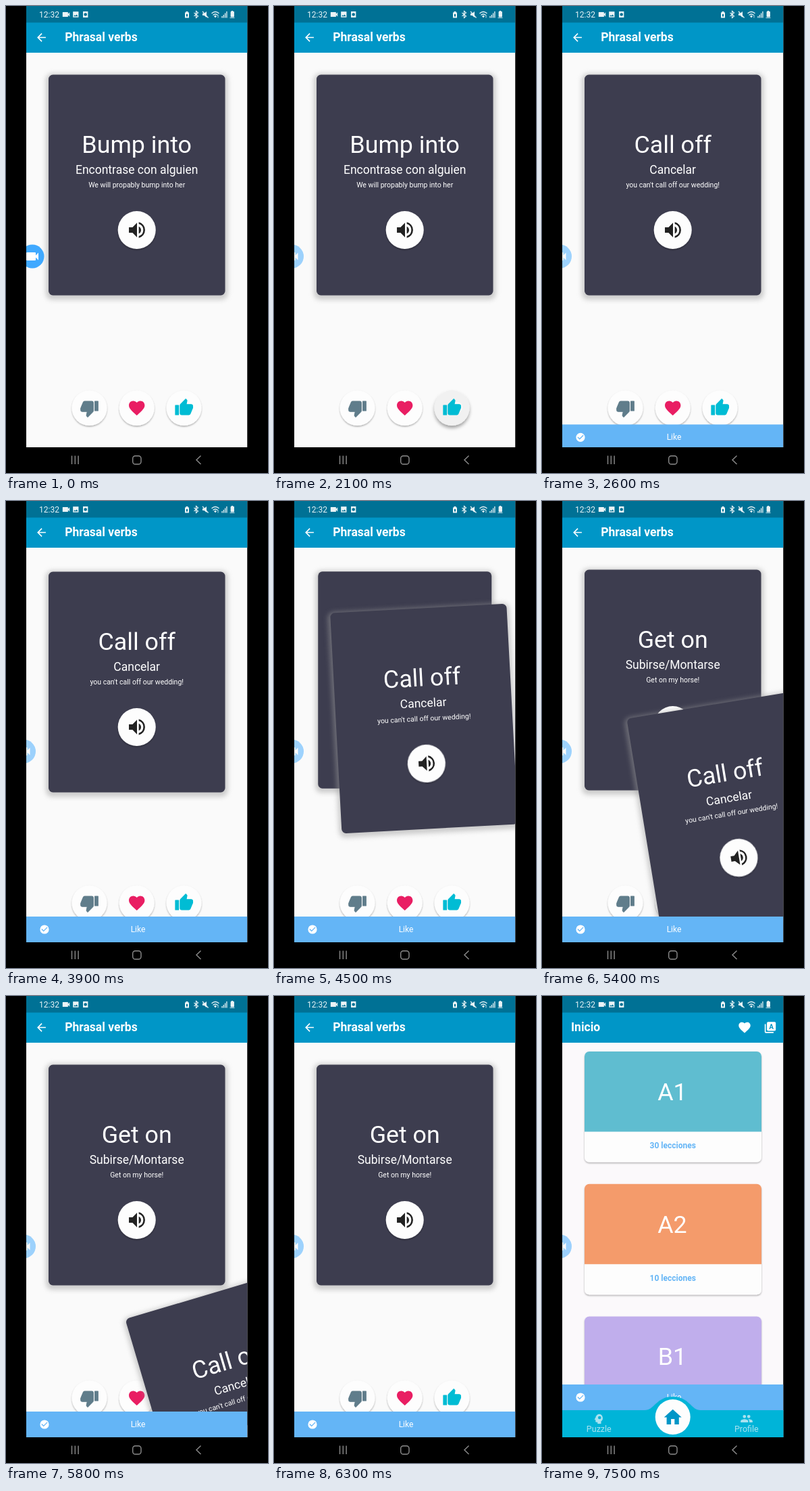
Write an HTML page that moves like this. It is 388 px wide and 690 px high and loops after 8000 ms.

```html
<!DOCTYPE html>
<html lang="es">
<head>
<meta charset="utf-8">
<title>Phrasal verbs</title>
<style>
html, body { margin: 0; width: 100%; height: 100%; overflow: hidden; background: #000; }
svg { display: block; width: 100%; height: 100%; }
text { font-family: Roboto, sans-serif; fill: #fff; }
.mid { text-anchor: middle; }
.head { font-size: 17.5px; font-weight: 700; }
.big { font-size: 35.8px; }
.sub { font-size: 17.5px; }
.note { font-size: 10.5px; }
.like { font-size: 12px; }
.count { font-size: 12px; font-weight: 700; fill: #64b5f6; }
.tab { font-size: 12.5px; fill: #a9e2f0; }
</style>
</head>
<body>
<svg id="stage" viewBox="0 0 388 690"></svg>
<script>
const LOOP = 8000, STEP = 100;
const CX = 193.7, CY = 264.5;
const stage = document.getElementById('stage');

// 24-unit icon outlines
const P = {
  back: 'M20 11H7.83l5.59-5.59L12 4l-8 8 8 8 1.41-1.41L7.83 13H20z',
  thumb: 'M1 21h4V9H1zM23 10c0-1.1-.9-2-2-2h-6.3l1-4.9c0-.4-.2-.8-.5-1L14.2 1 7.6 7.6C7.2 8 7 8.5 7 9v10c0 1.1.9 2 2 2h9c.8 0 1.5-.5 1.8-1.2l3-7.1c.1-.2.2-.5.2-.7z',
  heart: 'M12 21.35l-1.45-1.32C5.4 15.36 2 12.28 2 8.5 2 5.42 4.42 3 7.5 3c1.74 0 3.41.81 4.5 2.09C13.09 3.81 14.76 3 16.5 3 19.58 3 22 5.42 22 8.5c0 3.78-3.4 6.86-8.55 11.54z',
  sound: 'M3 9v6h4l5 5V4L7 9zM16.5 12A4.5 4.5 0 0 0 14 7.97v8.05A4.5 4.5 0 0 0 16.5 12zM14 3.23v2.06a7 7 0 0 1 0 13.42v2.06a9 9 0 0 0 0-17.54z',
  check: 'M12 2a10 10 0 1 0 0 20 10 10 0 0 0 0-20zM10 17l-5-5 1.4-1.4L10 14.2l7.6-7.6L19 8z',
  cam: 'M17 10.5V7a1 1 0 0 0-1-1H4a1 1 0 0 0-1 1v10a1 1 0 0 0 1 1h12a1 1 0 0 0 1-1v-3.5l4 4v-11z',
  image: 'M3 3h18v18H3zM5 18h14l-4.5-6-3.5 4.5-2.5-3z',
  frame: 'M4 2h16v20H4zM12 7a5 5 0 1 0 0 10 5 5 0 0 0 0-10z',
  home: 'M10 20v-6h4v6h5v-8h3L12 3 2 12h3v8z',
  people: 'M16 11a3 3 0 1 0 0-6 3 3 0 0 0 0 6zM8 11a3 3 0 1 0 0-6 3 3 0 0 0 0 6zM8 13c-2.3 0-7 1.2-7 3.5V19h14v-2.500C15 14.200 10.300 13 8 13zM16 13l-1 .1c1.200.8 2 2 2 3.400V19h6v-2.500c0-2.300-4.700-3.500-7-3.500z',
  mind: 'M13 3a8 8 0 0 0-8 7l-2 3.500c-.2.300 0 .5.400.5H5v3a2 2 0 0 0 2 2h2v3h7v-4.700A8 8 0 0 0 13 3zM13 7a3 3 0 1 1 0 6 3 3 0 0 1 0-6z',
  letters: 'M2 6h2v14h14v2H4a2 2 0 0 1-2-2zM8 2h12a2 2 0 0 1 2 2v12a2 2 0 0 1-2 2H8a2 2 0 0 1-2-2V4a2 2 0 0 1 2-2zM10 15h1.700l.8-2.200h3l.8 2.200H18L14.900 5.500h-1.800zM13 11.300l1-3.300 1 3.300z'
};

const icon = (name, x, y, s, fill = '#fff', extra = '') =>
  `<path d="${P[name]}" fill="${fill}" fill-rule="evenodd" transform="translate(${x} ${y}) scale(${s}) translate(-12 -12)" ${extra}/>`;
const label = (cls, x, y, str) => `<text class="${cls}" x="${x}" y="${y}">${str}</text>`;
const rect = (x, y, w, h, fill, extra = '') =>
  `<rect x="${x}" y="${y}" width="${w}" height="${h}" fill="${fill}" ${extra}/>`;
const disc = (x, y, r, extra = '') => `<circle cx="${x}" cy="${y}" r="${r}" fill="#fdfdfd" ${extra}/>`;

const card = id => `<g id="${id}">
  ${rect(59, 100, 269.5, 334, '#9e9e9e', 'rx="9" opacity=".5" filter="url(#glow)"')}
  ${rect(63, 101.5, 261.5, 326, '#3d3d4f', 'rx="6.500"')}
  ${label('mid big', CX, 216.5, '')}${label('mid sub', CX, 247.5, '')}${label('mid note', CX, 268, '')}
  ${disc(CX, 331, 28, 'filter="url(#lift)"')}${icon('sound', 194, 331, 1.33, '#222')}</g>`;

const snack = (id, y) => `<g id="${id}">${rect(30, y, 327.5, 39, '#64b5f6')}
  ${icon('check', 57, y + 19, .66)}${label('mid like', 195.5, y + 23, 'Like')}</g>`;

const bar = title => rect(30, 0, 327.5, 69, '#0096c7') + title;

const round = 'stroke-width="1" stroke-linejoin="round"';
const thumb = (x, fill, flip) => `<g transform="translate(${x} 594) rotate(${flip})">
  ${icon('thumb', 0, -.5, 1.16, fill, `${round} stroke="${fill}"`)}</g>`;

const level = (name, color, y, count) => `<g transform="translate(0 ${y})">
  ${rect(63, 0, 262, 163.5, '#fdfdfd', 'rx="7" filter="url(#lift)"')}
  <path d="M63 118.500V7a7 7 0 0 1 7-7h248a7 7 0 0 1 7 7v111.500z" fill="${color}"/>
  ${label('mid big', 193, 72, name)}${label('mid count', CX, 143, count)}</g>`;

const status = `${rect(30, 0, 327.5, 24.5, '#000', 'opacity=".25"')}
  <g opacity=".92">${label('', 49, 17, '12:32').replace('<text', '<text font-size="12"')}
  ${icon('cam', 89, 12.5, .58)}${icon('image', 103.3, 12.500, .46)}${icon('frame', 117.7, 12.5, .46)}
  <path d="M265 9.500h1.500v-1.500h3v1.500h1.500v8h-6zM267 12v3.500h2V12z" fill="#fff" fill-rule="evenodd"/>
  <path d="M278.500 10l6 5-3 2.500v-10l3 2.500-6 5" fill="none" stroke="#fff" stroke-width="1.100"/>
  <path d="M291 11h2.500l3.500-3v9l-3.500-3H291z" fill="#fff"/><path d="M291 8l8.500 9.500" stroke="#fff" stroke-width="1.200"/>
  <path d="M304.500 11q5.500-5 11 0M306.500 13.500q3.500-3 7 0" fill="none" stroke="#fff" stroke-width="1.300"/>
  <path d="M308.500 15l1.500-1 1.500 1-1.500 2zM314 13v4.500" fill="#fff" stroke="#fff" stroke-width=".8"/>
  <path d="M320 17.500v-2.500M322.300 17.500v-4.500M324.600 17.500v-7M326.900 17.500v-9.500" stroke="#fff" stroke-width="1.300"/>
  <path d="M333 8.500h1v-1h2v1h1.500v7.500h-4.500zM331.500 17.500h7" fill="#fff" stroke="#fff" stroke-width=".8"/></g>`;

const system = `${rect(0, 652, 388, 38, '#000')}
  <g fill="none" stroke="#8c8c8c" stroke-width="1.400"><path d="M97.500 664.500v12.500M102.300 664.500v12.500M107.100 664.500v12.500M288.500 664.500l-6.500 6.300 6.500 6.300"/>
  <rect x="187.700" y="664.700" width="12.300" height="12.300" rx="3.800"/></g>`;

stage.innerHTML = `<defs>
  <clipPath id="phone">${rect(30, 0, 327.5, 652, '#000')}</clipPath>
  <clipPath id="body">${rect(30, 69, 327.5, 583, '#000')}</clipPath>
  <filter id="glow" x="-10%" y="-10%" width="120%" height="120%"><feGaussianBlur stdDeviation="3.600"/></filter>
  <filter id="lift" x="-20%" y="-20%" width="140%" height="150%"><feDropShadow dx="0" dy="1.500" stdDeviation="1.300" flood-opacity=".32"/></filter>
  <filter id="high" x="-30%" y="-30%" width="160%" height="170%"><feDropShadow dx="0" dy="3.500" stdDeviation="2.800" flood-opacity=".36"/></filter>
</defs>
<rect width="388" height="690"/>
<g clip-path="url(#phone)">
  <g id="levels">
    ${rect(30, 0, 327.5, 652, '#fbf9fb')}
    ${level('A1', '#5fbdd0', 82, '30 lecciones')}
    ${level('A2', '#f49b6b', 277.7, '10 lecciones')}
    ${level('B1', '#c0aeec', 473.4, '10 lecciones')}
    ${bar(label('head', 43, 52, 'Inicio') + icon('heart', 300, 46.5, .87) + icon('letters', 338, 46.5, .82))}
    ${snack('homeSnack', 574)}
    <path d="M30 612H152C167 612 169 592 193.700 592S220 612 235 612H358V652H30z" fill="#00b4d8" filter="url(#lift)"/>
    ${disc(CX, 622, 26)}${icon('home', CX, 622.5, 1.3, '#0096c7')}
    ${icon('mind', 84.500, 624.5, .75, '#a9e2f0')}${label('mid tab', 84.3, 644, 'Puzzle')}
    ${icon('people', 303, 624.5, .8, '#a9e2f0')}${label('mid tab', 302.8, 644, 'Profile')}
  </g>
  <g id="verbs">
    ${rect(30, 0, 327.5, 652, '#fafafa')}
    <g clip-path="url(#body)">
      ${disc(123.5, 594, 26, 'filter="url(#lift)"')}${thumb(123.5, '#607d8b', 180)}
      ${disc(CX, 594, 26, 'filter="url(#lift)"')}${icon('heart', CX, 594, 1.17, '#e91e63')}
      ${disc(263.5, 594, 26, 'id="likeBtn"')}<circle id="ripple" cx="271" cy="593" r="8" fill="#fff" opacity=".6"/>${thumb(263.700, '#00bcd4', 0)}
      ${card('rear')}${card('front')}
      ${snack('snack', 614)}
    </g>
    ${bar(icon('back', 52.5, 46.5, .8) + label('head', 87.2, 52, 'Phrasal verbs'))}
  </g>
  ${status}
  <g id="bubble"><circle r="17.500" fill="#40a9ff"/>${icon('cam', 0, 0, 1)}</g>
</g>
${system}`;

const el = id => document.getElementById(id);
const [levels, verbs, likeBtn, ripple, rear, front, snackBar, bubble] =
  ['levels', 'verbs', 'likeBtn', 'ripple', 'rear', 'front', 'snack', 'bubble'].map(el);

const words = [
  ['Bump into', 'Encontrase con alguien', 'We will propably bump into her'],
  ['Call off', 'Cancelar', "you can't call off our wedding!"],
  ['Get on', 'Subirse/Montarse', 'Get on my horse!']
];
// time, dx, dy of the hand drag and the fling after it
const drag = [[3900, 0, 3], [4500, 28.6, 57], [5400, 87, 197], [5700, 118, 255], [6200, 300, 640]];

const clamp = v => Math.max(0, Math.min(1, v));
const show = (node, on) => node.setAttribute('display', on ? 'inline' : 'none');
const move = (node, value) => node.setAttribute('transform', value);

function along(points, t) {
  const i = Math.max(1, points.findIndex(p => p[0] >= t));
  const [a, b] = [points[i - 1], points[i]];
  const k = clamp((t - a[0]) / (b[0] - a[0]));
  return [a[1] + (b[1] - a[1]) * k, a[2] + (b[2] - a[2]) * k];
}

function fill(node, index) {
  node.querySelectorAll('text').forEach((line, i) => { line.textContent = words[index][i]; });
}

function render(time) {
  const t = Math.floor(time / STEP) * STEP;

  const tuck = clamp(t / 200);
  move(bubble, `translate(${39 - 12.5 * tuck} 370)`);
  bubble.setAttribute('opacity', 1 - .5 * tuck);

  const pressed = t >= 2100 && t < 2300;
  likeBtn.setAttribute('filter', `url(#${pressed ? 'high' : 'lift'})`);
  likeBtn.setAttribute('fill', pressed ? '#f1f1f1' : '#fdfdfd');
  show(ripple, pressed);

  const top = t < 2500 ? 0 : t < 6200 ? 1 : 2;
  let dx = 0, dy = 0, turn = 0;
  if (t >= 2300 && t < 2500) {
    dx = (t - 2200) * 1.3;
    turn = dx * .086;
  } else if (t >= 3900 && t < 6200) {
    [dx, dy] = along(drag, t);
    turn = -dx * .107;
  }
  fill(front, top);
  move(front, `translate(${dx} ${dy}) rotate(${turn} ${CX} ${CY})`);

  const away = Math.hypot(dx, dy);
  show(rear, away > 0);
  if (away > 0) {
    fill(rear, top + 1);
    move(rear, `translate(${CX} ${CY}) scale(${.9 + .1 * clamp(away / 77)}) translate(${-CX} ${-CY})`);
  }

  const rise = clamp((t - 2400) / 300);
  move(snackBar, `translate(0 ${39 * (1 - rise) ** 2})`);

  const leave = clamp((t - 7100) / 400);
  show(levels, leave > 0);
  show(verbs, leave < 1);
  move(verbs, `translate(0 ${170 * leave * leave})`);
  verbs.setAttribute('opacity', 1 - leave);
}

const start = performance.now();
function tick() {
  render((performance.now() - start) % LOOP);
  requestAnimationFrame(tick);
}
tick();
</script>
</body>
</html>
```
